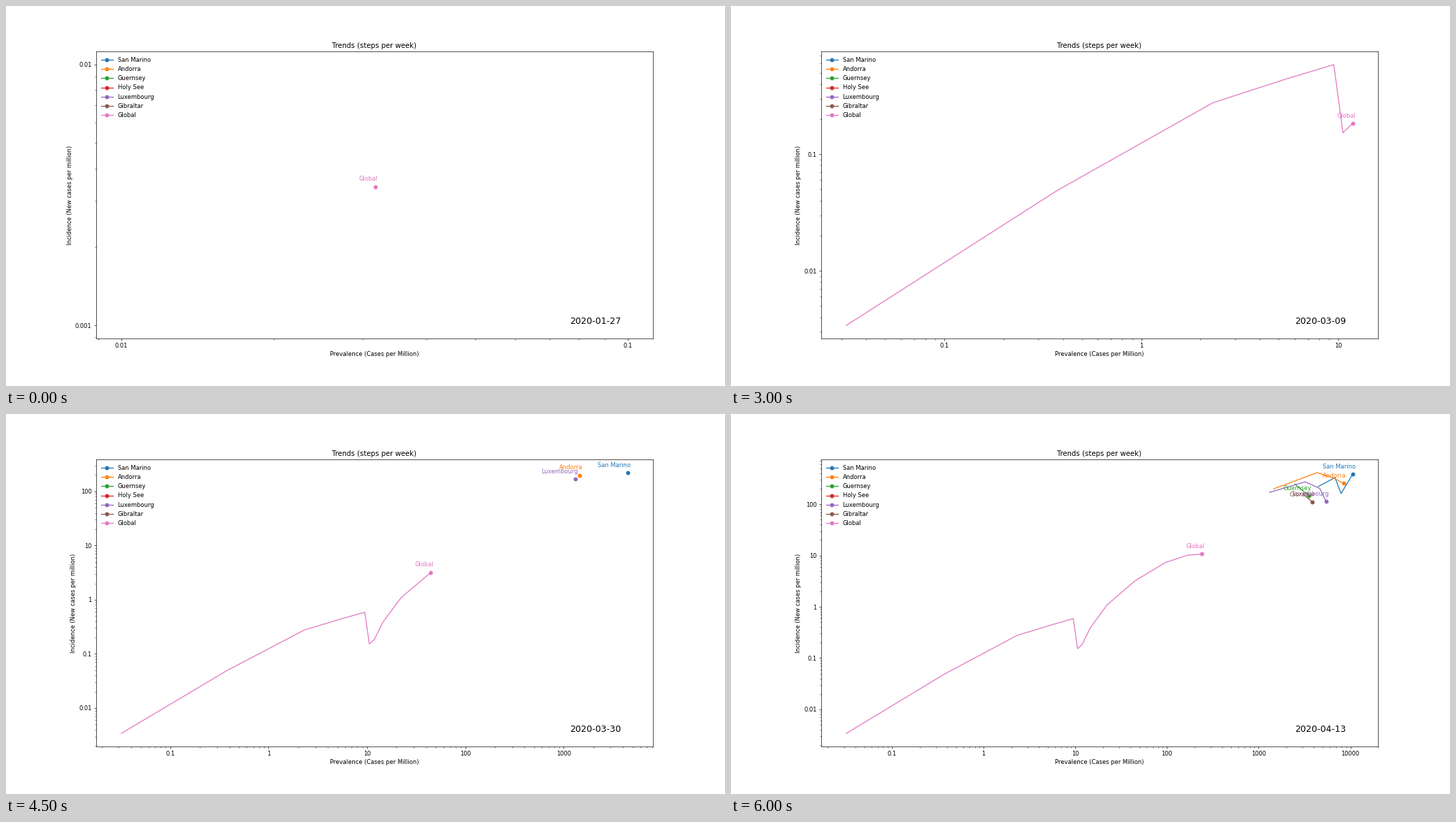
A matplotlib script for the animation above (10 s loop, 1028 by 544 pixels).

```python
import matplotlib.pyplot as plt
import numpy as np
from matplotlib.animation import FuncAnimation
from matplotlib.ticker import FuncFormatter, LogLocator, NullFormatter

DPI = 60.5
NUDGE = 0.001  # keeps the pixel size from rounding down
STEP_MS, LOOP_MS = 500, 10000
START, LAST = np.datetime64("2020-01-27"), np.datetime64("2020-04-13")
WEEKS = 13

# name: (first week, first incidence, weekly cases per million)
SERIES = {
    "San Marino": (9, 222, [4486, 6790, 7920, 10620]),
    "Andorra": (9, 199, [1455, 4340, 6600, 8380]),
    "Guernsey": (11, 248, [2475, 3500]),
    "Holy See": (WEEKS, 0, []),
    "Luxembourg": (9, 170, [1311, 3220, 4640, 5434]),
    "Gibraltar": (11, 155, [3087, 3857]),
    "Global": (0, 0.0034, [0.0317, 0.374, 2.31, 5.39, 9.5, 10.57, 11.86,
                           14.6, 22.25, 44.6, 95.4, 166, 240.7]),
}

plt.rcParams.update({"font.family": "DejaVu Sans", "font.size": 10})
fig, ax = plt.subplots(
    figsize=((1028 + NUDGE) / DPI, (544 + NUDGE) / DPI), dpi=DPI)
fig.subplots_adjust(left=0.125, right=0.9, bottom=0.125, top=0.88)
ax.set(xscale="log", yscale="log", title="Trends (steps per week)",
       xlabel="Prevalence (Cases per Million)",
       ylabel="Incidence (New cases per million)")
for axis in (ax.xaxis, ax.yaxis):
    axis.set_major_locator(LogLocator(numticks=50))
    axis.set_minor_locator(LogLocator(subs=range(2, 10), numticks=50))
    axis.set_major_formatter(FuncFormatter(lambda v, _: f"{v:g}"))
    axis.set_minor_formatter(NullFormatter())

tracks = []
for i, (name, (first, rate, total)) in enumerate(SERIES.items()):
    prevalence = np.array(total, float)
    # incidence is the mean daily rise over the week
    incidence = np.concatenate(([rate], np.diff(prevalence) / 7))[:len(total)]
    line, = ax.plot([], [], "o-", color=f"C{i}", label=name, markevery=[-1])
    tag = ax.annotate(name, (1, 1), xytext=(5, 10), ha="right",
                      textcoords="offset points", color=f"C{i}")
    tracks.append((first, prevalence, incidence, line, tag))

ax.legend(loc="upper left", frameon=False)
stamp = ax.text(0.85, 0.05, "", transform=ax.transAxes, fontsize=15)


def padded(values, margin=0.05):
    """Log-scale limits with a margin; a lone value spans its decade."""
    lo, hi = np.log10(min(values)), np.log10(max(values))
    if lo == hi:
        lo, hi = np.floor(lo), np.ceil(hi)
    pad = margin * (hi - lo)
    return 10 ** (lo - pad), 10 ** (hi + pad)


def update(step):
    week = min(step, WEEKS - 1)
    xs, ys = [], []
    for first, prevalence, incidence, line, tag in tracks:
        n = max(0, week - first + 1)
        x, y = prevalence[:n], incidence[:n]
        shown = len(x) > 0
        line.set_data(x, y)
        line.set_visible(shown)
        tag.set_visible(shown)
        if shown:
            tag.xy = (x[-1], y[-1])
            xs.extend(x)
            ys.extend(y)
    ax.set_xlim(padded(xs))
    ax.set_ylim(padded(ys))
    stamp.set_text(str(min(START + 7 * week, LAST)))
    return []


anim = FuncAnimation(fig, update, frames=LOOP_MS // STEP_MS,
                     init_func=lambda: update(0), interval=STEP_MS,
                     repeat=True, repeat_delay=0, blit=False)
plt.show()
```
